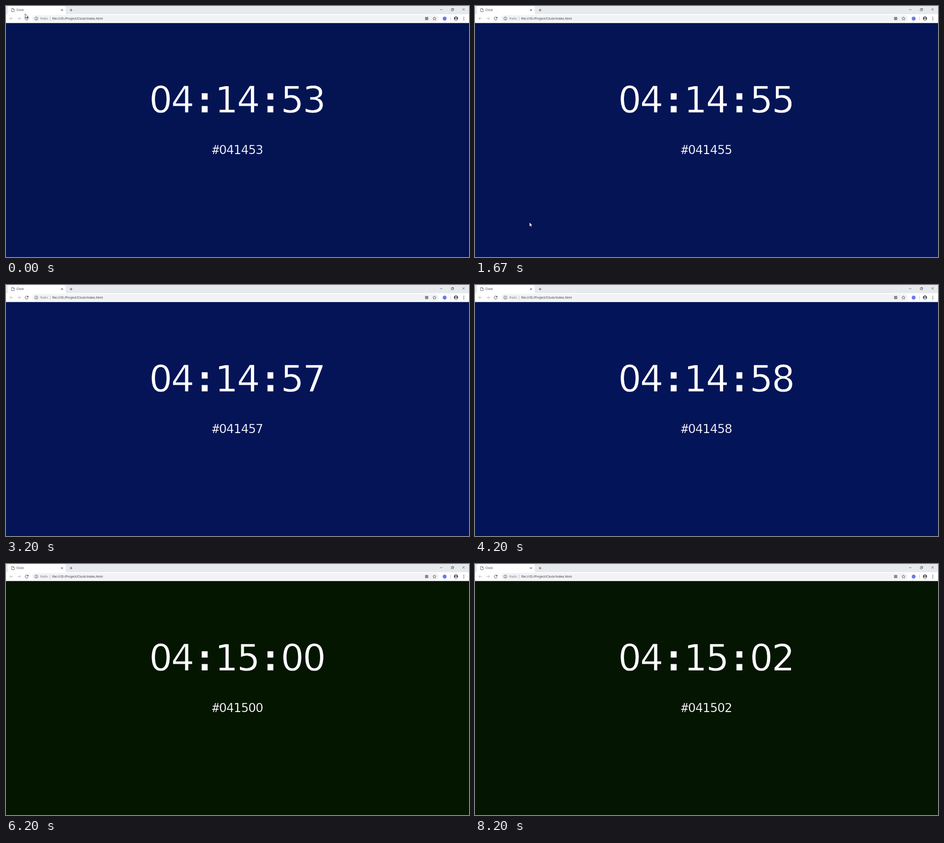
Animation, 1017 px wide and 551 px high, one loop 9.14 s. Source, as an HTML page:

```html
<!DOCTYPE html>
<html lang="en">
<head>
<meta charset="utf-8">
<title>Clock</title>
<style>
  html, body { margin: 0; width: 100%; height: 100%; overflow: hidden; }
  svg { display: block; width: 1017px; height: 551px; }
  .ui { font-family: "Open Sans", "Noto Sans", sans-serif; fill: #2c2f33; }
  .digits { font-family: "DejaVu Sans", sans-serif; fill: #fff; text-anchor: middle; }
  .colon { font-weight: bold; font-size: 78px; }
  .hash { font-family: "DejaVu Sans Mono", monospace; }
  .line { fill: none; stroke: #4a4d51; stroke-width: 1; }
  .dim { stroke: #b4b7ba; }
  .thin { stroke-width: .8; }
</style>
</head>
<body>
<svg viewBox="0 0 1017 551">
  <!-- browser frame -->
  <rect width="1017" height="19" fill="#e7eaed"/>
  <rect y="18" width="1017" height="20" fill="#fff"/>
  <path d="M1 18.5Q4 18 4 15V4Q4 0 8 0H127Q131 0 131 4V15Q131 18 134 18.5Z" fill="#fff"/>
  <rect x="57" y="20" width="894" height="15" rx="7.5" fill="#f1f3f4"/>

  <g class="line">
    <path class="thin" d="M12.5 5.5H16L18 7.5V12.5H12.5ZM15.8 5.5V7.7H18"/>
    <path d="M121 7L125 11M125 7L121 11M140 9H146M143 6V12"/>
    <path class="thin" d="M953.5 8H958.5M978 6.7H982V10.5H978ZM979.2 6.5V5.5H983.2V9.3H982.2M1002.5 5L1007.5 10M1007.5 5L1002.5 10"/>
    <path class="dim" d="M15.3 27.5H8.5M11.7 24.2L8.4 27.5L11.7 30.8M25 27.5H32M28.7 24.2L32 27.5L28.7 30.8"/>
    <path d="M48.3 25.6A3.4 3.4 0 1 0 48.8 28.4"/>
    <path d="M49.2 23.4V26.9H45.7Z" fill="#4a4d51" stroke="none"/>
    <circle class="thin" cx="66.7" cy="27.5" r="3.5"/>
    <path d="M66.7 27V29.7M66.7 25.3V26.2"/>
    <path class="dim thin" d="M97 23.5V32M976.5 23.5V32"/>
    <path class="thin" d="M941.2 23.7L942.3 26.2L945 26.5L943 28.3L943.6 31L941.2 29.6L938.8 31L939.4 28.3L937.4 26.5L940.1 26.2Z"/>
  </g>
  <rect x="920.5" y="24" width="7" height="7" rx="1" fill="#85898d"/>
  <circle cx="963.5" cy="27.6" r="4.3" fill="#6f78ec"/>
  <circle cx="988.4" cy="27.5" r="4.5" fill="#4a4d51"/>
  <g fill="#fff"><circle cx="988.4" cy="26" r="1.5"/><ellipse cx="988.4" cy="29.8" rx="2.7" ry="1.3"/></g>
  <g fill="#4a4d51"><circle cx="1005.6" cy="24.7" r=".9"/><circle cx="1005.6" cy="27.6" r=".9"/><circle cx="1005.6" cy="30.5" r=".9"/></g>
  <g class="ui">
    <text x="23" y="11.2" font-size="6.4">Clock</text>
    <text x="75" y="30" font-size="6.7" fill="#75797d">Файл</text>
    <text x="101.5" y="30" font-size="7.15">file:///D:/Project/Clock/Index.html</text>
  </g>

  <!-- the outline in the page colour makes the digits a little lighter -->
  <g id="page">
    <rect y="37.4" width="1017" height="514"/>
    <g class="digits">
      <text id="time" y="234.3" font-size="80" stroke="inherit" stroke-width=".8"></text>
      <text id="code" y="325" font-size="26.67" stroke-width=".25"></text>
    </g>
  </g>
  <path id="cursor" d="M0 0V9.6L2.2 7.6L3.7 10.8L5.2 10.1L3.8 7H6.7Z" fill="#fff" stroke="#000" stroke-width=".7"/>
</svg>
<script>
const LOOP = 9140, STEP = 1000 / 15, START = 4 * 3600 + 14 * 60 + 53;
const byId = id => document.getElementById(id);
const page = byId('page'), cursor = byId('cursor');

// time, x, y of the pointer
const path = [
  [0, 42, 17], [133, 42, 17], [1000, 366, 355], [1067, 366, 355],
  [2000, 18, 524], [2133, 16, 530], [2267, 28, 538], [2460, 28, 538],
  [2467, 30, 545], [2870, 31, 551]
];

// Every glyph gets its own cell of fixed pitch, centred on the page.
function makeCells(parent, count, pitch) {
  return Array.from({ length: count }, (_, i) => {
    const cell = document.createElementNS('http://www.w3.org/2000/svg', 'tspan');
    cell.setAttribute('x', 508.6 + (i - (count - 1) / 2) * pitch);
    parent.append(cell);
    return cell;
  });
}
const timeCells = makeCells(byId('time'), 8, 48.17);
const codeCells = makeCells(byId('code'), 7, 16.06);
for (const i of [2, 5]) timeCells[i].classList.add('colon');
codeCells[0].classList.add('hash');

const write = (cells, text) => cells.forEach((cell, i) => { cell.textContent = text[i]; });

function showTime(seconds) {
  const parts = [seconds / 3600, seconds / 60 % 60, seconds % 60]
    .map(n => String(Math.floor(n)).padStart(2, '0'));
  const code = '#' + parts.join('');
  write(timeCells, parts.join(':'));
  write(codeCells, code);
  page.firstElementChild.setAttribute('fill', code);
  page.lastElementChild.setAttribute('stroke', code);
}

function moveCursor(t) {
  const snapped = Math.floor((t + 4) / STEP) * STEP;
  const next = path.findIndex(p => p[0] > snapped);
  cursor.style.display = next < 0 ? 'none' : '';
  if (next < 0) return;
  const [t0, x0, y0] = path[next - 1], [t1, x1, y1] = path[next];
  const u = (snapped - t0) / (t1 - t0);
  const k = t1 - t0 > 500 ? u * u * (3 - 2 * u) : u;
  cursor.setAttribute('transform', `translate(${x0 + (x1 - x0) * k} ${y0 + (y1 - y0) * k})`);
}

let shown = -1;
function frame() {
  const t = performance.now() % LOOP;
  const seconds = START + Math.floor((t + 800) / 1000);
  if (seconds !== shown) showTime(shown = seconds);
  moveCursor(t);
  requestAnimationFrame(frame);
}
frame();
</script>
</body>
</html>
```
